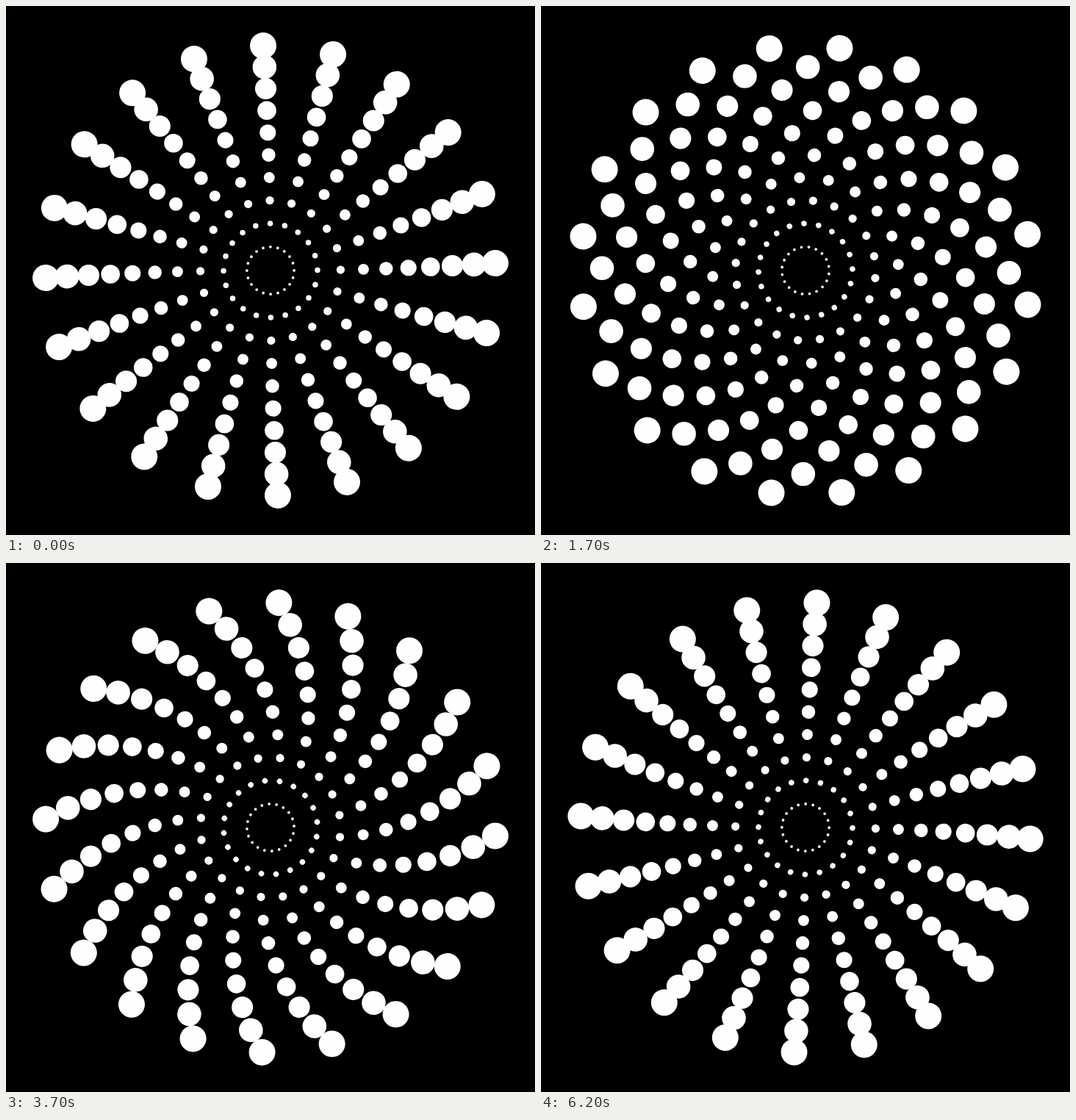
An HTML page that plays this animation: 720 px wide and 720 px high, repeating every 6300 ms.

```html
<!DOCTYPE html>
<html lang="en">
<head>
<meta charset="utf-8">
<title>Twisting dot rings</title>
<style>
  html, body { margin: 0; width: 100%; height: 100%; overflow: hidden; background: #000; }
  svg { display: block; width: 100vw; height: 100vh; }
</style>
</head>
<body>
<svg id="stage" viewBox="0 0 720 720" fill="#fefefe">
  <rect width="720" height="720" fill="#000"/>
</svg>
<script>
  const NS = 'http://www.w3.org/2000/svg';
  const LOOP = 6300, STEP = 100;
  const RINGS = 10, ARMS = 20;
  const stage = document.getElementById('stage');

  function add(parent, name, attrs = {}) {
    const el = document.createElementNS(NS, name);
    for (const key in attrs) el.setAttribute(key, attrs[key]);
    return parent.appendChild(el);
  }

  // Ring spacing shrinks slightly outwards; dots scale with their distance.
  function makeRing(n) {
    const ring = add(stage, 'g');
    const dist = 32.32 * n - 0.171 * n * n;
    for (let k = 0; k < ARMS; k++) {
      const a = k * 2 * Math.PI / ARMS;
      add(ring, 'circle', {
        cx: (dist * Math.sin(a)).toFixed(3),
        cy: (-dist * Math.cos(a)).toFixed(3),
        r: (dist / 17).toFixed(3)
      });
    }
    return ring;
  }

  const rings = Array.from({ length: RINGS }, (_, i) => makeRing(i + 1));

  // Each ring turns counter-clockwise at a speed proportional to its index.
  function draw(ms) {
    const tick = Math.floor((ms % LOOP) / STEP);
    const twist = -(0.00326 + 0.01 * tick) * 180 / Math.PI;
    rings.forEach((ring, i) => {
      ring.setAttribute('transform', `translate(360 360) rotate(${twist * (i + 1)})`);
    });
  }

  const start = performance.now();
  function loop() {
    draw(performance.now() - start);
    requestAnimationFrame(loop);
  }
  loop();
</script>
</body>
</html>
```
